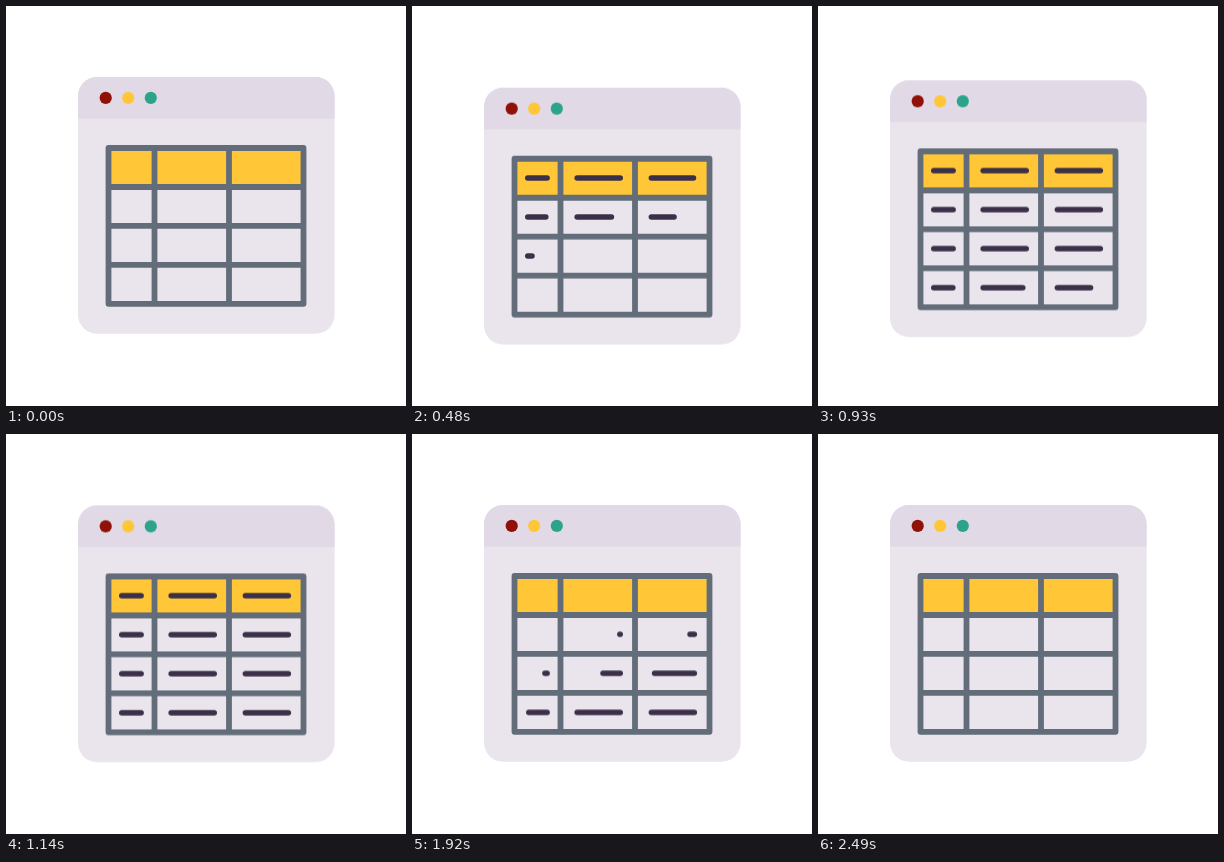
Write an HTML page without scripts that moves like this. It is 400 by 400 pixels and loops after 4.55 s.

```html
<!DOCTYPE html>
<html lang="en">
<head>
<meta charset="utf-8">
<title>Table filling in a window</title>
<style>
  html, body { margin: 0; width: 100%; height: 100%; overflow: hidden; background: #fff; }
  svg { display: block; width: 100%; height: 100%; }

  .window { animation: bob 4550ms infinite; }
  @keyframes bob {
    0% { transform: translateY(0); animation-timing-function: cubic-bezier(.37, 0, .53, 1); }
    10.55% { transform: translateY(10.7px); animation-timing-function: cubic-bezier(.37, 0, .53, 1); }
    27.7%, 100% { transform: translateY(0); }
  }

  .grid { fill: none; stroke: #626d79; stroke-width: 5.8; stroke-linecap: round; stroke-linejoin: round; }

  /* Each bar draws in from the left, then is wiped away towards the right. */
  .bars path {
    --c: 0;
    fill: none;
    stroke: #3b3048;
    stroke-width: 5.6;
    stroke-linecap: round;
    stroke-opacity: 0;
    stroke-dasharray: 0 2;
    animation: draw 4550ms ease infinite, wipe 4550ms ease infinite;
    animation-delay:
      calc(31ms + var(--r) * 194ms + var(--c) * 70ms),
      calc(1295ms + var(--r) * 200ms + var(--c) * 97ms);
  }
  .bars path:nth-child(2) { --c: 1; }
  .bars path:nth-child(3) { --c: 2; }

  @keyframes draw {
    0% { stroke-dasharray: 0 2; stroke-opacity: 1; }
    8.3%, 60% { stroke-dasharray: 1 2; stroke-opacity: 1; }
    60.01%, 100% { stroke-dasharray: 0 2; stroke-opacity: 0; }
  }
  @keyframes wipe {
    0% { stroke-dashoffset: 0; opacity: 1; }
    8.15% { stroke-dashoffset: -1; opacity: 1; }
    8.16%, 60% { stroke-dashoffset: -1; opacity: 0; }
    60.01%, 100% { stroke-dashoffset: 0; opacity: 1; }
  }
</style>
</head>
<body>
<svg viewBox="0 0 400 400">
  <g class="window">
    <rect x="72" y="71" width="256.6" height="256.8" rx="19" fill="#eae4ec"/>
    <path d="M72 112.4V90a19 19 0 0 1 19-19h218.6a19 19 0 0 1 19 19v22.4z" fill="#e1d9e6"/>
    <circle cx="99.7" cy="91.9" r="6.1" fill="#8f1108"/>
    <circle cx="122.2" cy="91.9" r="6.1" fill="#ffc738"/>
    <circle cx="144.8" cy="91.9" r="6.1" fill="#2ca48c"/>

    <path d="M102.5 142h195v39h-195z" fill="#ffc738"/>
    <path class="grid" d="M102.5 142h195v155.8h-195zM102.5 181h195M102.5 219.9h195M102.5 258.9h195M148.5 142v155.8M223 142v155.8"/>

    <g class="bars">
      <g style="--r:0" transform="translate(0 161.3)">
        <path pathLength="1" d="M115.8 0H135.1"/>
        <path pathLength="1" d="M165.2 0H208.2"/>
        <path pathLength="1" d="M239.4 0H282.3"/>
      </g>
      <g style="--r:1" transform="translate(0 200.3)">
        <path pathLength="1" d="M115.8 0H135.1"/>
        <path pathLength="1" d="M165.2 0H208.2"/>
        <path pathLength="1" d="M239.4 0H282.3"/>
      </g>
      <g style="--r:2" transform="translate(0 239.3)">
        <path pathLength="1" d="M115.8 0H135.1"/>
        <path pathLength="1" d="M165.2 0H208.2"/>
        <path pathLength="1" d="M239.4 0H282.3"/>
      </g>
      <g style="--r:3" transform="translate(0 278.4)">
        <path pathLength="1" d="M115.8 0H135.1"/>
        <path pathLength="1" d="M165.2 0H208.2"/>
        <path pathLength="1" d="M239.4 0H282.3"/>
      </g>
    </g>
  </g>
</svg>
</body>
</html>
```
